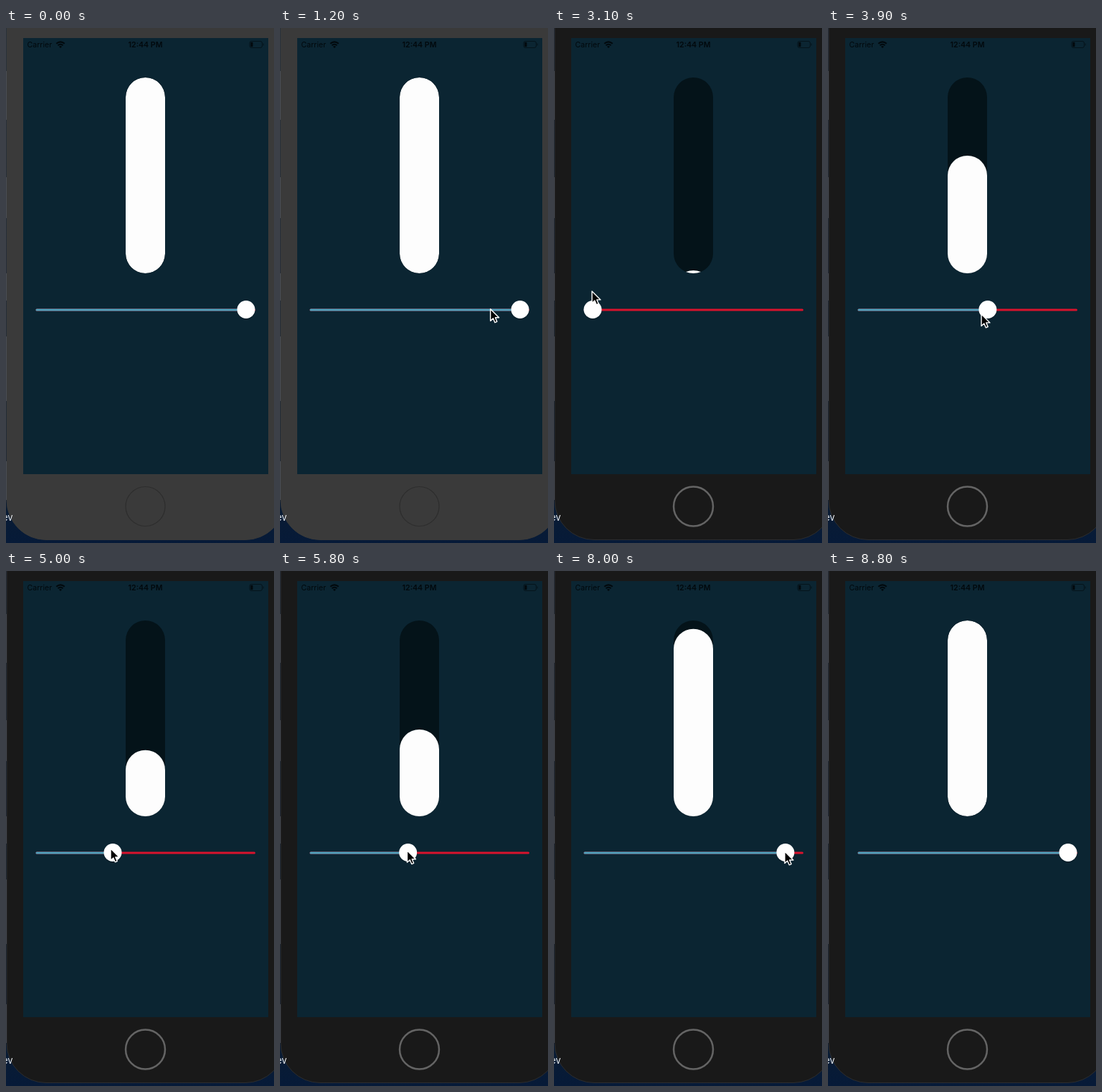
An HTML page that plays this animation: 374 px wide and 718 px high, repeating every 9.9 s.

```html
<!DOCTYPE html>
<html lang="en">
<head>
<meta charset="utf-8">
<title>Slider</title>
<style>
  html, body { margin: 0; width: 100%; height: 100%; overflow: hidden; background: #08172a; }
  svg { display: block; width: 374px; height: 718px; }
  text { font: 10.6px Inter, Roboto, sans-serif; fill: #02090d; }
  #body { fill: #3a3a3a; stroke: #3a3a3a; }
  #home { fill: none; stroke: #2d2d2d; stroke-width: 1.2; }
  .active #body { fill: #191919; stroke: #2c2d2f; }
  .active #home { stroke: #646464; stroke-width: 2.5; }
  .line { stroke-width: 3; stroke-linecap: round; }
</style>
</head>
<body>
<svg id="stage" viewBox="0 0 374 718">
  <defs>
    <linearGradient id="sea" x2="0" y2="1">
      <stop offset="0" stop-color="#1b2a3c"/>
      <stop offset=".9" stop-color="#0b1c31"/>
      <stop offset="1" stop-color="#061a38"/>
    </linearGradient>
    <clipPath id="tube"><rect x="167" y="69" width="55" height="273" rx="27.5"/></clipPath>
  </defs>

  <rect width="374" height="718" fill="url(#sea)"/>
  <path d="M0 60V128M0 208V265M0 342V380M0 430V520M0 604V658" stroke="#59636f" stroke-width="2"/>
  <rect id="body" x="1" y="-90" width="388" height="803.5" rx="55"/>
  <text x="-5" y="687" style="font-size:13px;fill:#e8ebee">ev</text>
  <circle id="home" cx="194.5" cy="667" r="27.5"/>
  <rect x="24" y="14" width="342" height="608" fill="#0b2532"/>

  <text x="29.5" y="27">Carrier</text>
  <text x="194.5" y="27" text-anchor="middle" font-weight="600" style="font-weight:600">12:44 PM</text>
  <g fill="none" stroke="#02090d" stroke-width="2">
    <path d="M70.3 21.7Q76 17 81.7 21.7M72.5 24.2Q76 21.2 79.5 24.2"/>
    <path d="M76 28L74 25.9Q76 24.3 78 25.9Z" fill="#02090d" stroke="none"/>
    <rect x="340" y="18.5" width="17.5" height="9" rx="2.5" stroke-width="1" stroke-opacity=".6"/>
    <path d="M359.2 21.5V24.5" stroke-width="1" stroke-opacity=".6"/>
    <rect x="341.3" y="19.8" width="3.2" height="6.4" rx="1" fill="#02090d" stroke="none"/>
  </g>

  <g clip-path="url(#tube)">
    <rect x="167" y="69" width="55" height="273" fill="#041319"/>
    <rect id="fill" x="167" width="55" height="273" rx="27.5" fill="#fdfdfd"/>
  </g>

  <path class="line" d="M43 393H346.5" stroke="#d8132d"/>
  <path class="line" id="done" stroke="#4aa3bd"/>
  <circle id="shade" cy="394" r="12.8" fill="#000" opacity=".15"/>
  <circle id="thumb" cy="392.5" r="12.5" fill="#fff"/>
  <path id="cursor" d="M0 0V16.5L3.8 13L6.3 18.8L9.2 17.5L6.8 11.9H12Z"
        fill="#000" stroke="#fff" stroke-width="1.4" stroke-linejoin="round"/>
</svg>
<script>
  const LOOP = 9900, STEP = 100;
  // time, cursor x, cursor y, slider value
  const keys = [
    [100, 316, 403, 1], [200, 172, 476, 1], [300, 58, 451, 1], [400, 58, 451, 1],
    [1400, 321, 385, 1], [1500, 328, 388, 1], [1900, 328, 388, 1],
    [2100, 252, 388, .73], [2200, 252, 388, .73], [2900, 46, 374, 0],
    [3100, 53, 367, 0], [3900, 214, 399, .601], [4000, 214, 399, .601],
    [4300, 262, 398, .77], [4800, 121, 390, .25], [5000, 146, 387, .338],
    [5400, 52, 388, 0], [5900, 192, 390, .495], [6300, 192, 390, .495],
    [7100, 54, 391, 0], [7300, 54, 392, 0], [8100, 334, 391, 1],
    [8400, 351, 393, 1], [LOOP, 351, 393, 1]
  ];
  const $ = id => document.getElementById(id);
  const set = (id, name, value) => $(id).setAttribute(name, value);

  function pose(t) {
    if (t <= keys[0][0]) return keys[0].slice(1);
    const i = keys.findIndex(k => k[0] >= t);
    const a = keys[i - 1], b = keys[i];
    const p = (t - a[0]) / (b[0] - a[0]);
    const e = p * p * (3 - 2 * p);
    return [1, 2, 3].map(n => a[n] + (b[n] - a[n]) * e);
  }

  function draw(now) {
    const t = Math.floor(now % LOOP / STEP) * STEP;
    const [x, y, v] = pose(t);
    const knob = 54 + 281 * v;
    $('stage').classList.toggle('active', t >= 1800);
    set('fill', 'y', 342 - Math.max(4, 273 * v));
    set('done', 'd', `M43 393H${knob}`);
    set('thumb', 'cx', knob);
    set('shade', 'cx', knob);
    set('cursor', 'transform', `translate(${x} ${y})`);
    set('cursor', 'visibility', t >= 100 && t < 8800 ? 'visible' : 'hidden');
    requestAnimationFrame(draw);
  }

  const start = performance.now();
  (function tick() {
    const frame = () => { drawAt(); requestAnimationFrame(frame); };
    const drawAt = () => render(performance.now() - start);
    const render = ms => {
      const raf = window.requestAnimationFrame;
      window.requestAnimationFrame = () => 0;
      draw(Math.max(0, ms));
      window.requestAnimationFrame = raf;
    };
    frame();
  })();
</script>
</body>
</html>
```
